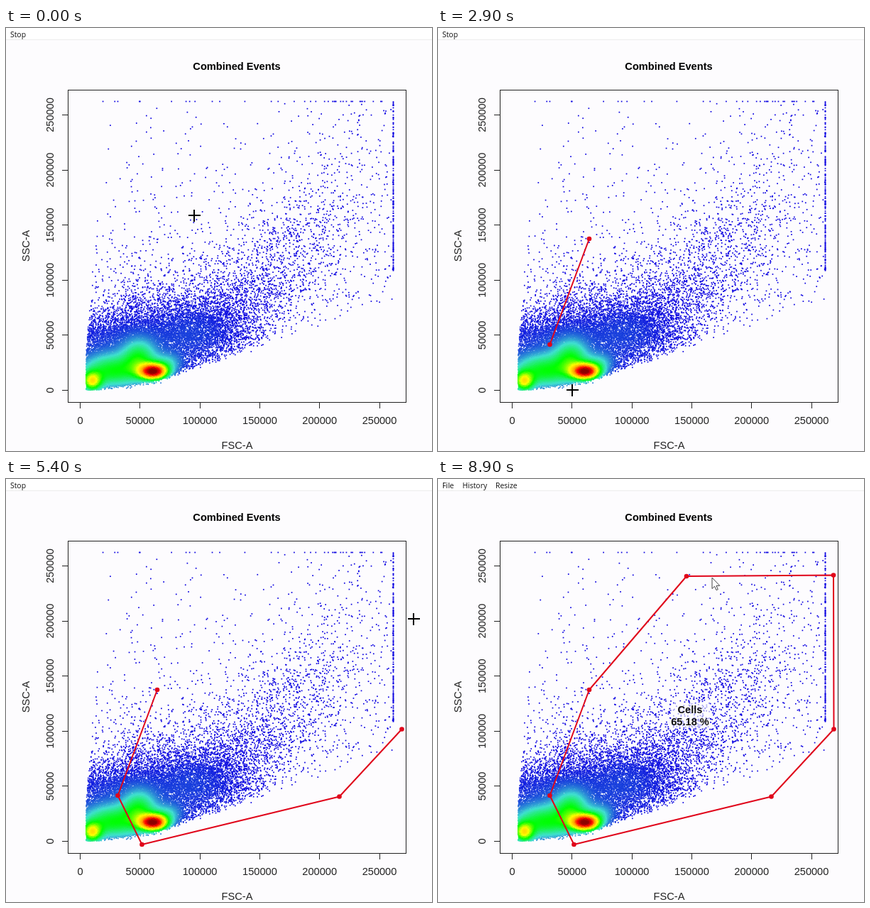
These frames come from a looping animation (600x596 px, 9000 ms). An HTML page with a canvas:

```html
<!DOCTYPE html>
<html lang="en">
<head>
<meta charset="utf-8">
<title>Polygon gate</title>
<style>
html, body { margin: 0; width: 100%; height: 100%; overflow: hidden; background: #fdfcfe; }
canvas { display: block; }
</style>
</head>
<body>
<canvas id="stage" width="600" height="596"></canvas>
<script>
const LOOP = 9000, STEP = 100, CLOSE = 8400, ARROW = 7900;
const RED = '#e0051a';
const PLOT_FONT = '14.6px "Liberation Sans", Arial, sans-serif';
const MENU_FONT = '10.4px "Open Sans", sans-serif';

// Pointer stops; a click sets a gate corner
const click = (t, x, y) => ({ t, x, y, corner: true });
const pass = (t, x, y) => ({ t, x, y });
const route = [
  pass(0, 265, 264), click(1300, 213, 297), pass(2100, 171, 441), click(2400, 157.5, 446),
  click(3100, 191.5, 515), pass(3700, 477, 454), click(4100, 469.5, 447.5),
  click(4900, 557.5, 352.5), pass(5400, 574, 197), pass(6000, 571, 150), pass(6400, 416, 145),
  click(7000, 557, 135.5), click(7800, 350, 137), pass(8000, 346, 122), pass(8900, 386, 139)
];

// Density peaks, used for both the colours and the number of events
const peak = (x, y, sx, sy, h) => ({ x, y, sx, sy, h });
const peaks = [
  peak(208, 484, 13, 7.5, 0.9),
  peak(121, 498, 9, 9, 0.42),
  peak(148, 484, 30, 16, 0.3),
  peak(188, 466, 16, 18, 0.24),
  peak(228, 472, 14, 10, 0.13),
  peak(265, 430, 36, 25, 0.04),
  peak(170, 450, 50, 25, 0.05)
];
const ramp = [[10, 0, 225], [64, 224, 208], [0, 255, 0], [255, 255, 0], [255, 165, 0], [255, 0, 0], [139, 0, 0]];

let seed = 7;
function rand() {
  seed = (seed * 1664525 + 1013904223) >>> 0;
  return (seed + 0.5) / 4294967296;
}
const gauss = () => Math.sqrt(-2 * Math.log(rand())) * Math.cos(2 * Math.PI * rand());
const mix = (a, b, k) => a + (b - a) * k;

function densityColor(x, y) {
  let d = 0;
  for (const p of peaks)
    d += p.h * Math.exp(-(((x - p.x) / p.sx) ** 2 + ((y - p.y) / p.sy) ** 2) / 2);
  const v = Math.min(d, 0.999) * (ramp.length - 1), i = Math.floor(v);
  return `rgb(${ramp[i].map((c, n) => Math.round(mix(c, ramp[i + 1][n], v - i)))})`;
}

function drawScatter(c) {
  const dot = (x, y) => {
    c.fillStyle = densityColor(x, y);
    c.fillRect(x - 0.85, y - 0.85, 1.7, 1.7);
  };
  const event = (x, y) => {
    const floor = (x < 210 ? 511 - (x - 112) * 0.15 : 496 - (x - 210) * 0.33) + gauss() * 2.5;
    const left = 113 + Math.max(0, 455 - y) * 0.08;
    if (x > left && x < 545 && y > 105 && y < Math.min(floor, 510)) dot(x, y);
  };
  const cloud = (n, x, y, sx, sy, slope = 0) => {
    while (n-- > 0) {
      const dx = sx * gauss();
      event(x + dx, y + slope * dx + sy * gauss());
    }
  };
  const tail = (n, x, sx, y, scale) => {
    while (n--) event(x + sx * gauss(), y + scale * Math.log(rand()));
  };
  const scatter = (n, x0, y0, x1, y1) => {
    while (n--) event(mix(x0, x1, rand()), mix(y0, y1, rand()));
  };

  for (const p of peaks) cloud(80 * p.h * p.sx * p.sy, p.x, p.y, p.sx, p.sy);
  tail(2400, 215, 65, 440, 43);
  cloud(800, 310, 405, 40, 36, -0.3);
  cloud(1000, 375, 350, 58, 52, -0.8);
  cloud(750, 400, 335, 80, 80, -0.5);
  scatter(130, 435, 105, 545, 390);
  scatter(90, 170, 105, 435, 260);

  // Events piled up at the detector limits
  for (let i = 0; i < 18; i++) {
    dot(mix(130, 440, rand()), 103.5);
    dot(mix(440, 545, rand()), 103.5);
  }
  for (let i = 0; i < 160; i++) dot(545.5, 104 + 240 * rand() ** 1.2);
}

function label(c, text, x, y, turned) {
  c.save();
  c.translate(x, y);
  if (turned) c.rotate(-Math.PI / 2);
  c.fillText(text, 0, 0);
  c.restore();
}

function drawPlot(c) {
  c.fillStyle = '#fdfcfe';
  c.fillRect(0, 0, 600, 596);
  drawScatter(c);

  c.strokeStyle = c.fillStyle = '#222';
  c.lineWidth = 1;
  c.strokeRect(87.5, 87.5, 476, 440);
  c.font = PLOT_FONT;
  c.textAlign = 'center';
  for (let i = 0; i < 6; i++) {
    const x = 104.5 + i * 84.3, y = 510.5 - i * 77.6, value = String(i * 50000);
    c.fillRect(Math.round(x - 0.5), 528, 1, 8);
    c.fillRect(79, Math.round(y - 0.5), 8, 1);
    label(c, value, x, 558);
    label(c, value, 67, y, true);
  }
  label(c, 'FSC-A', 325.5, 592.5);
  label(c, 'SSC-A', 33, 307, true);
  c.fillStyle = '#000';
  c.font = 'bold ' + PLOT_FONT;
  label(c, 'Combined Events', 325, 59);
}

const ctx = document.getElementById('stage').getContext('2d');
const plot = document.createElement('canvas');
plot.width = 600;
plot.height = 596;
drawPlot(plot.getContext('2d'));

function drawMenu(closed) {
  ctx.fillStyle = '#fff';
  ctx.fillRect(0, 0, 600, 16);
  ctx.fillStyle = '#ececec';
  ctx.fillRect(0, 16, 600, 1);
  ctx.fillStyle = '#111';
  ctx.font = MENU_FONT;
  ctx.textAlign = 'left';
  let x = 6;
  for (const text of closed ? ['File', 'History', 'Resize'] : ['Stop']) {
    ctx.fillText(text, x, 13);
    x += ctx.measureText(text).width + 12;
  }
}

function drawGate(t, closed) {
  const shown = route.filter(p => p.corner && t >= p.t);
  ctx.strokeStyle = ctx.fillStyle = RED;
  ctx.lineWidth = 2;
  ctx.lineJoin = 'round';
  ctx.beginPath();
  for (const { x, y } of shown) ctx.lineTo(x, y);
  if (closed) ctx.closePath();
  ctx.stroke();
  for (const { x, y } of shown) {
    ctx.beginPath();
    ctx.arc(x, y, 3.3, 0, 2 * Math.PI);
    ctx.fill();
  }
}

function drawResult() {
  ctx.fillStyle = 'rgba(255,255,255,0.6)';
  ctx.fillRect(328, 316, 55, 34);
  ctx.fillStyle = '#111';
  ctx.font = 'bold ' + PLOT_FONT;
  ctx.textAlign = 'center';
  ctx.fillText('Cells', 355, 330);
  ctx.fillText('65.18 %', 355, 347);
}

// Each leg eases in and out and rests briefly before its stop time
function pointerAt(t) {
  const i = Math.max(1, route.findIndex(p => p.t >= t));
  const a = route[i - 1], b = route[i];
  const k = Math.min(1, (t - a.t) / (b.t - a.t) / 0.85), e = k * k * (3 - 2 * k);
  return [Math.round(mix(a.x, b.x, e)), Math.round(mix(a.y, b.y, e))];
}

const arrow = new Path2D('M0 0V15.5L3.6 12.2L6 17.6L8.3 16.6L6 11.3H10.8Z');
function drawPointer(t) {
  ctx.save();
  ctx.translate(...pointerAt(t));
  if (t < ARROW) {
    ctx.fillStyle = '#000';
    ctx.fillRect(-8, -1, 17, 2);
    ctx.fillRect(-1, -8, 2, 17);
  } else {
    ctx.fillStyle = '#fff';
    ctx.strokeStyle = '#444';
    ctx.lineWidth = 1;
    ctx.fill(arrow);
    ctx.stroke(arrow);
  }
  ctx.restore();
}

const start = performance.now();
function frame() {
  const t = Math.floor(((performance.now() - start) % LOOP) / STEP) * STEP;
  const closed = t >= CLOSE;
  ctx.drawImage(plot, 0, 0);
  drawMenu(closed);
  drawGate(t, closed);
  if (closed) drawResult();
  drawPointer(t);
  requestAnimationFrame(frame);
}
frame();
</script>
</body>
</html>
```
